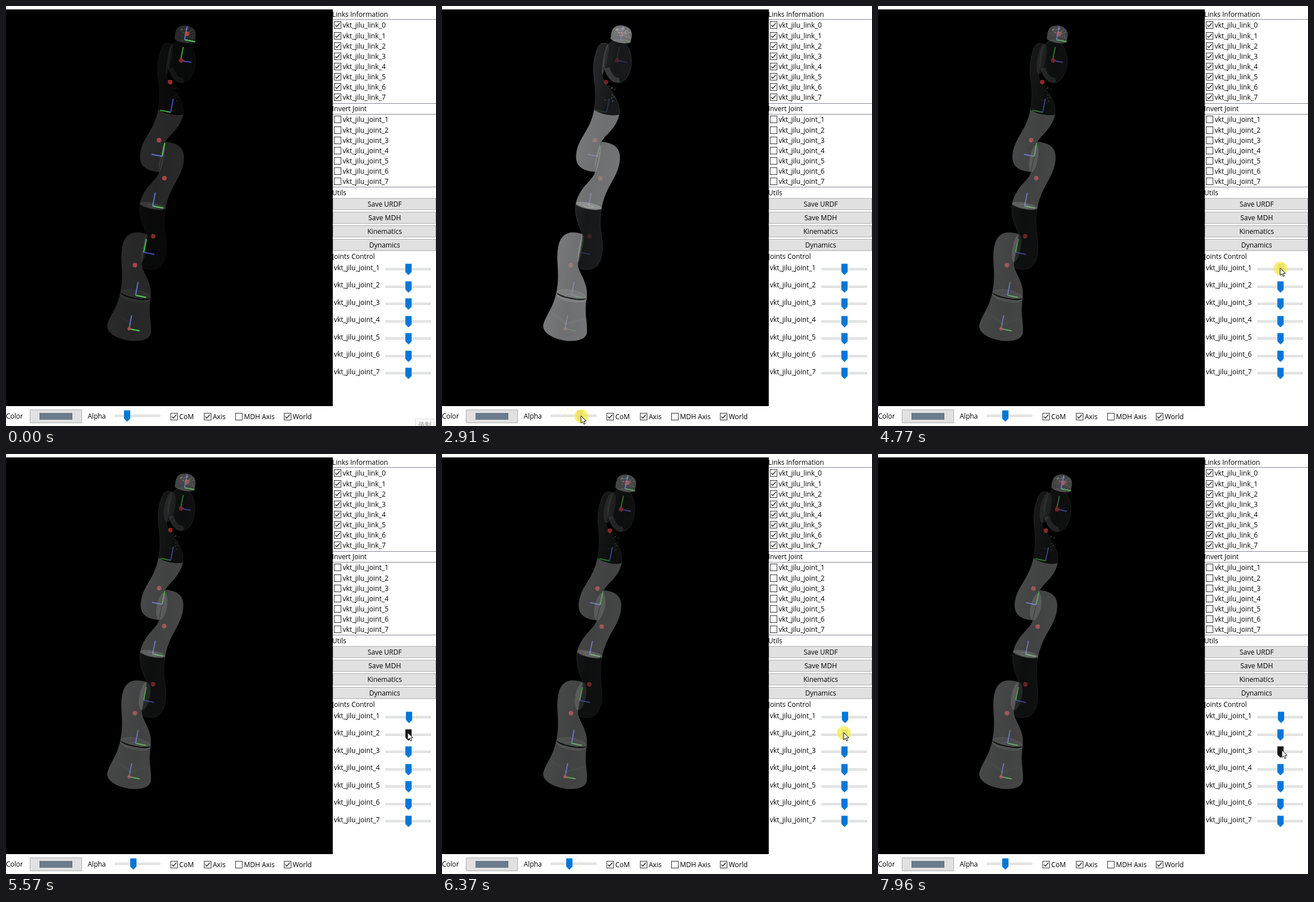
An HTML page with a canvas that plays this animation: 758x739 px, repeating every 8 s.

```html
<!DOCTYPE html>
<html>
<head>
<meta charset="utf-8">
<title>Robot arm viewer</title>
<style>
html, body { margin: 0; width: 100%; height: 100%; overflow: hidden; background: #fff; }
canvas { display: block; }
</style>
</head>
<body>
<canvas id="stage" width="758" height="739"></canvas>
<script>
const c = document.getElementById('stage').getContext('2d');
const LOOP = 8000;

const ramp = (t, a, b) => Math.max(0, Math.min(1, (t - a) / (b - a)));
const ease = (t, a, b) => 1 - (1 - ramp(t, a, b)) ** 4;

function random(seed) {
  return () => (seed = seed * 16807 % 2147483647) / 2147483647;
}

// ---- State at time t ----
// Mouse presses: from, to, x, y of the release
const presses = [[1200, 3440, 228, 720], [4600, 5310, 709, 462], [5720, 6920, 709, 491]];

function stateAt(t) {
  const raise = ease(t, 1530, 2950), j1 = ramp(t, 4650, 5280);
  const s = {
    t,
    alphaX: 213 + 29.5 * raise - 18.5 * ease(t, 2950, 3350),
    turn: j1 + 0.8 * Math.sin(Math.PI * j1),
    tilt: ramp(t, 5750, 6370),
    down: presses.some(p => t >= p[0] && t < p[1]),
    x: 746, y: 724
  };
  const go = (a, b, x, y) => {
    const k = ease(t, a, b);
    s.x += (x - s.x) * k;
    s.y += (y - s.y) * k;
  };
  go(70, 640, 165, 718);
  go(640, 900, s.alphaX + 2.5, 717 + 4 * raise);
  go(3510, 4250, 707 + 3 * s.turn, 461);
  go(5330, 5570, 708, 490);
  go(7200, 7700, 712, 521);
  return s;
}

// ---- Robot: x runs across the arm's axis, u runs up along it ----
function shape(at, build) {
  const p = new Path2D();
  build({
    move: (x, u) => p.moveTo(...at(x, u)),
    line: (x, u) => p.lineTo(...at(x, u)),
    curve: (a, b, d, e, x, u) => p.bezierCurveTo(...at(a, b), ...at(d, e), ...at(x, u))
  });
  return p;
}

// A tube from the ring at u0 that swings to one side and ends in a round cap
function elbow(u0, dir, side, size, half, cut = 0) {
  const path = shape((x, u) => [side * x, -(u0 + dir * u * size)], p => {
    p.move(-half, 0);
    p.curve(1 - half, 32, cut, 45, cut, 63);
    p.line(cut + 1, 115);
    p.curve(cut / 2 + 24, 118, 39, 110, 39, 84);
    p.curve(39, 55, half, 40, half, 0);
    p.curve(half / 2, -dir * 6, -half / 2, -dir * 6, -half, 0);
  });
  return { path, mass: [side * 11, u0 + dir * 52], disc: [side * cut, u0 + dir * 89 * size, 26 * size] };
}

// Upright body with a wide foot or a domed top, the same on both sides
function body(u0, u1, w0, w1, sag0, sag1) {
  const mid = (u0 + u1) / 2;
  return shape((x, u) => [x, -u], p => {
    p.move(-w1, u1);
    p.curve(-w1 - 1, mid, 2 - w0, mid - 10, -w0, u0);
    p.curve(-w0, u0 - sag0, w0, u0 - sag0, w0, u0);
    p.curve(w0 - 2, mid - 10, w1 + 1, mid, w1, u1);
    p.curve(w1, u1 + sag1, -w1, u1 + sag1, -w1, u1);
  });
}

const wrist = new Path2D();
wrist.ellipse(2, -480, 24.5, 38, -0.2, 0, 7);

const links = [
  { path: body(0, 60, 39, 27, 27, -9), mass: [0, 0] },
  elbow(60, 1, -1, 0.95, 27),
  { ...elbow(220, -1, 1, 0.96, 23), dark: true },
  elbow(220, 1, 1, 1, 23),
  elbow(388, -1, -1, 0.93, 22.5),
  { ...elbow(388, 1, -1, 1.03, 22.5, 20), dark: true },
  { path: wrist, mass: [1, 481], dark: true },
  { path: body(518, 528, 18, 18, 7, 20), mass: [2, 529] }
];
const origins = [0, 60, 137, 220, 309, 388, 481, 518];

function ellipse(x, y, rx, ry, fill, edge) {
  c.beginPath();
  c.ellipse(x, y, rx, ry, 0, 0, 7);
  if (fill) { c.fillStyle = fill; c.fill(); }
  if (edge) { c.strokeStyle = edge; c.lineWidth = 1; c.stroke(); }
}

function ray(u, dx, du, color) {
  c.strokeStyle = color;
  c.lineWidth = 2;
  c.beginPath();
  c.moveTo(0, -u);
  c.lineTo(dx, -u - du);
  c.stroke();
}

function drawFrame(i, a) {
  const u = origins[i], side = i === 4 || i === 5 ? -19 : 19, bent = i && i % 2 === 0;
  const [x, m] = links[i].mass;
  c.globalAlpha = Math.max(0.2, Math.min(1, 1.33 - 1.6 * a));
  ray(u, bent ? 0 : side, bent ? 24 : 0, '#40e040');
  c.globalAlpha = 1.1 - 0.7 * a;
  ray(u, bent ? side : 0, bent ? 0 : 24, '#4a66e8');
  ellipse(x, -m, i ? 4 : 3, i ? 4 : 3, '#b02a2a');
  c.globalAlpha = 1;
}

function speckle(n, x, u, w, h, color) {
  const rnd = random(n);
  c.fillStyle = color;
  for (let i = 0; i < n; i++) c.fillRect(x + (rnd() - 0.5) * w, -u + (rnd() - 0.5) * h, 1 + rnd() * 3, 1 + rnd() * 2);
}

function drawRobot({ alphaX, turn, tilt }) {
  const a = (alphaX - 197) / 71;
  const gray = (v, k = 1) => `rgba(${v},${v + 1},${v + 3},${a * k})`;
  c.save();
  c.translate(217, 568);
  c.rotate(0.19);
  links.forEach(({ path, dark, disc }, i) => {
    c.save();
    if (i > 1) {
      c.translate(0, -137);
      c.rotate(tilt * 0.0207);
      c.translate(0, 137);
      c.scale(1 - 0.03 * turn, 1);
    }
    drawFrame(i, a);
    const g = c.createLinearGradient(-40, 0, 40, 0);
    (dark ? [62, 36, 40] : [188, 172, 182]).forEach((v, j) => g.addColorStop(j / 2, gray(v)));
    c.fillStyle = g;
    c.fill(path);
    c.strokeStyle = gray(200, dark ? 0.25 : 0.15);
    c.lineWidth = 1;
    c.stroke(path);
    if (disc && i !== 2 && i !== 3) {
      ellipse(disc[0], -disc[1], 3 + 6 * turn, disc[2], gray(dark ? 110 : 170, dark ? 0.5 : 0.6), gray(200, 0.2));
    }
    if (i === 0) {
      ellipse(0, -59, 27, 10, gray(210, 0.2), gray(220, 0.35));
      ellipse(0, -57, 11, 4.5, null, gray(220, 0.3));
      for (const x of [-30, -15, 15, 30]) ray(8, x, 6 + Math.abs(x) / 3, gray(210, 0.08));
    } else if (i === 3) {
      ellipse(0, -220, 23, 5.5, gray(220, 0.4), gray(220, 0.3));
      ellipse(0, -220, 9, 2.5, null, gray(220, 0.5));
    } else if (i === 5) {
      speckle(14, 0, 420, 16, 30, gray(170, 0.45));
    } else if (i === 6) {
      // Lighter crescent along the lower left
      c.clip(path);
      c.lineWidth = 18;
      c.strokeStyle = gray(130, 0.45);
      c.beginPath();
      c.ellipse(2, -480, 24.5, 38, -0.2, 1.4, 2.8);
      c.stroke();
    } else if (i === 7) {
      speckle(45, 0, 533, 27, 15, gray(235, 0.35));
    }
    c.restore();
  });
  c.restore();
}

// ---- Panel ----
function text(s, x, y, align = 'left', color = '#000') {
  c.font = '12px "Open Sans", "Noto Sans", "Noto Sans CJK SC", sans-serif';
  c.textAlign = align;
  c.fillStyle = color;
  c.fillText(s, x, y + 4.5);
}

function box(x, y, w, h, fill, edge) {
  c.fillStyle = fill;
  c.fillRect(x, y, w, h);
  c.strokeStyle = edge;
  c.lineWidth = 1;
  c.strokeRect(x + 0.5, y + 0.5, w - 1, h - 1);
}

function check(x, y, label, on) {
  y = Math.round(y);
  box(x, y - 6, 13, 13, '#fff', '#333');
  if (on) {
    c.strokeStyle = '#222';
    c.lineWidth = 1.3;
    c.beginPath();
    c.moveTo(x + 2.5, y + 0.5);
    c.lineTo(x + 5, y + 3.2);
    c.lineTo(x + 10.5, y - 3);
    c.stroke();
  }
  text(label, x + 15.5, y);
}

function slider(x, y, thumb, s) {
  y = Math.round(y);
  box(x, y - 2, 80, 4, '#e7eaea', '#d6d6d6');
  const over = s.t > 70 && Math.abs(s.x - thumb) < 8 && Math.abs(s.y - y) < 11;
  c.fillStyle = !over ? '#0078d7' : s.down ? '#ccc' : '#171717';
  c.beginPath();
  c.moveTo(thumb - 5, y - 9.5);
  c.lineTo(thumb + 6, y - 9.5);
  c.lineTo(thumb + 6, y + 5);
  c.lineTo(thumb + 0.5, y + 10.5);
  c.lineTo(thumb - 5, y + 5);
  c.fill();
}

function drawPanel(s) {
  text('Links Information', 575, 14);
  text('Invert Joint', 575, 180);
  text('Utils', 575, 328);
  text('Joints Control', 575, 440);
  c.fillStyle = '#828790';
  for (const y of [23, 171, 190, 318]) c.fillRect(576, y, 182, 1);
  for (let i = 0; i < 8; i++) check(578, 33.4 + 18.15 * i, 'vkt_jilu_link_' + i, true);
  for (let i = 0; i < 7; i++) {
    const name = 'vkt_jilu_joint_' + (i + 1), y = 30.5 * i;
    check(578, 199.4 + 18.15 * i, name, false);
    text(name, 578, 460 + y);
    slider(669, 463 + y, 709 + (i ? 0 : s.turn), s);
  }
  ['Save URDF', 'Save MDH', 'Kinematics', 'Dynamics'].forEach((label, i) => {
    box(576, 338 + 24 * i, 182, 21, '#e1e1e1', '#adadad');
    text(label, 667.5, 348.5 + 24 * i, 'center');
  });

  text('Color', 0, 721);
  box(42, 710, 92, 24, '#e1e1e1', '#adadad');
  c.fillStyle = '#6c7b8b';
  c.fillRect(59, 716, 58, 12);
  text('Alpha', 144, 721);
  slider(192, 721, s.alphaX, s);
  check(290, 722, 'CoM', true);
  check(349, 722, 'Axis', true);
  check(404, 722, 'MDH Axis', false);
  check(490, 722, 'World', true);
  if (s.t < 70) {
    box(721, 726, 34, 20, '#fcfcfc', '#ddd');
    text('录制', 738, 737, 'center', '#999');
  }
}

// ---- Pointer ----
function arc(x, y, r, from, to) {
  c.beginPath();
  c.arc(x, y, r, from, to);
  c.strokeStyle = 'rgba(245,235,130,.4)';
  c.lineWidth = 1;
  c.stroke();
}

function drawPointer({ t, x, y, down, alphaX }) {
  // Faint rings left behind by the drags
  if (down && alphaX > 230) for (let i = 0; i < 3; i++) arc(221 + 8 * i, 720, 14, 2, 4.3);
  for (const [, end, px, py] of presses) if (t > end) arc(px + 3, py, 13, -1.2, 1.2);
  if (t < 70) return;

  if (down) ellipse(x + 0.5, y + 1, 12, 12, 'rgba(246,234,60,.7)', 'rgba(250,244,150,.6)');
  c.beginPath();
  [[0, 0], [0, 13], [3, 10.2], [5.2, 15], [7.3, 14], [5.2, 9.4], [9.3, 9.2]]
    .forEach(([dx, dy]) => c.lineTo(x + dx, y + dy));
  c.closePath();
  c.fillStyle = '#fff';
  c.fill();
  c.strokeStyle = '#111';
  c.lineWidth = 1;
  c.stroke();
}

function draw() {
  const s = stateAt(performance.now() % LOOP);
  c.fillStyle = '#fff';
  c.fillRect(0, 0, 758, 739);
  c.fillStyle = '#000';
  c.fillRect(0, 6, 576, 698);
  drawRobot(s);
  drawPanel(s);
  drawPointer(s);
  requestAnimationFrame(draw);
}
draw();
</script>
</body>
</html>
```
